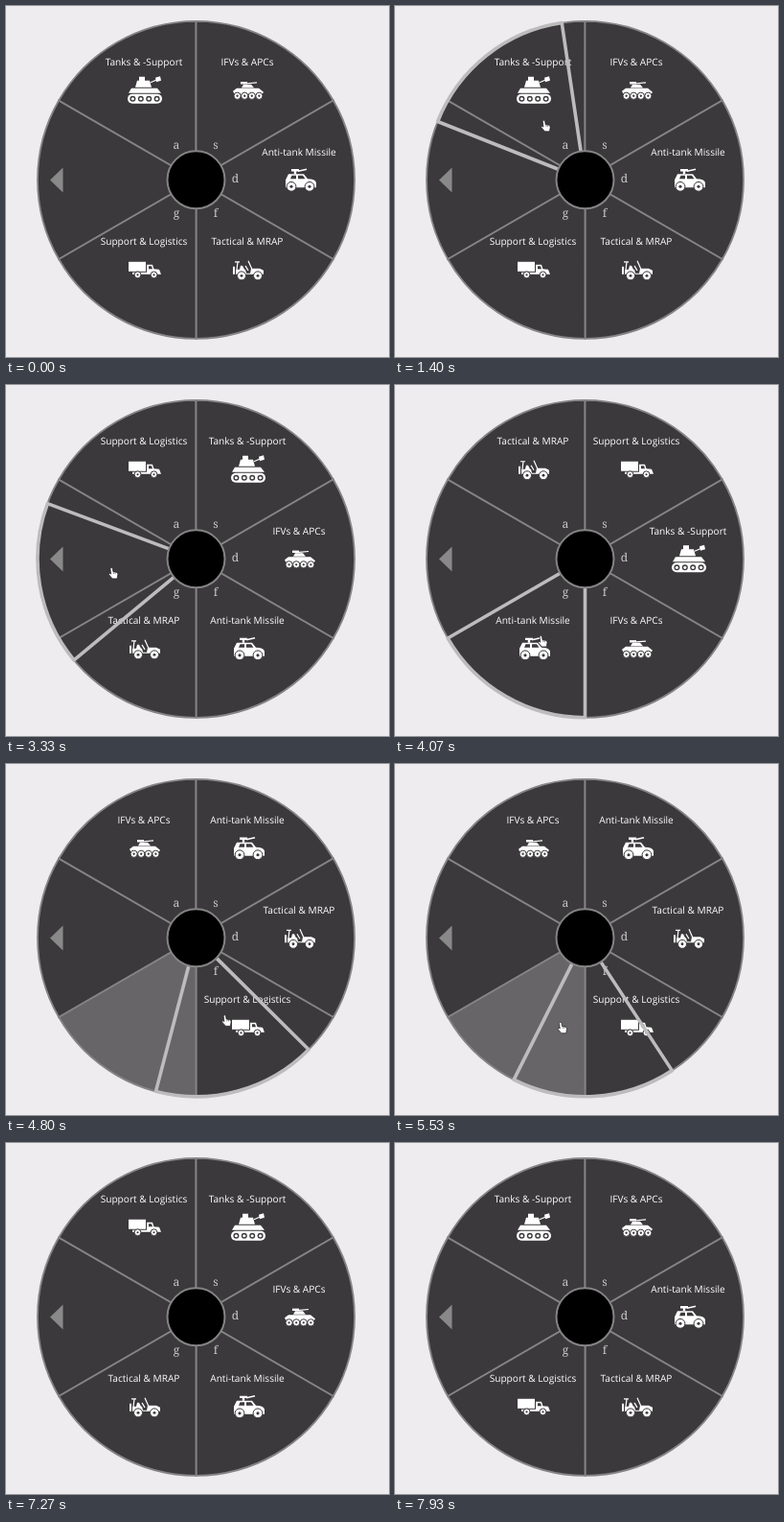
Animation of 400 by 366 pixels, one loop 8 s. Source, as an HTML page:

```html
<!DOCTYPE html>
<html lang="en">
<head>
<meta charset="utf-8">
<title>Radial vehicle menu</title>
<style>
  html, body { margin: 0; width: 100%; height: 100%; overflow: hidden; background: #eeecee; }
  svg { display: block; width: 100%; height: 100%; }
  text { text-anchor: middle; text-rendering: geometricPrecision; }
  .label { font: 10.15px "Open Sans", "Noto Sans", sans-serif; fill: #fff; }
  .key { font: 300 12px "Noto Serif", "Liberation Serif", serif; fill: #cbcacb; }
  .w { fill: #fff; }
  .d { fill: #3b393b; }
  .l { fill: none; stroke: #fff; }
</style>
</head>
<body>
<svg viewBox="0 0 400 366">
  <defs id="icons"></defs>
  <rect width="400" height="366" fill="#eeecee"/>
  <g id="sectors" stroke="#858485" stroke-width="1.8"></g>
  <path d="M46 181.5 59.5 168.5V194.5Z" fill="#8a898a"/>
  <g id="slots"></g>
  <path id="glow" fill="none" stroke="#bdbcbd" stroke-width="3.6" stroke-linejoin="round"/>
  <circle cx="198.5" cy="181.3" r="30" stroke="#858485" stroke-width="2"/>
  <g id="hand">
    <path d="M-1 1C-1-.6 1.2-.6 1.4 1L1.9 4 5.6 4.8Q7 5.2 6.9 6.8L6.2 11.3H1.3L-2.4 7.2Q-3 5.8-1.4 5.8L-.3 6.6Z"
      fill="#fff" stroke="#222" stroke-width=".7"/>
    <path d="M2.7 4.4V6.4M4.3 4.8V6.6" stroke="#555" stroke-width=".6"/>
  </g>
</svg>
<script>
const LOOP = 8000, CX = 198.5, CY = 181.3, R = 165.5, HUB = 30;
const ENTER = 270, LIT = 470, LEAVE = 6600, GONE = 6730;
const $ = id => document.getElementById(id);
const clamp = v => Math.max(0, Math.min(1, v));

const row = (n, gap, draw) => Array.from({ length: n }, (_, i) => draw((i - (n - 1) / 2) * gap)).join('');
const wheel = (x, y, r) =>
  `<circle class="w" cx="${x}" cy="${y}" r="${r}" stroke="#3b393b" stroke-width="1"/>` +
  `<circle class="d" cx="${x}" cy="${y}" r="${r * .32}"/>`;

const items = [
  { name: 'Tanks &amp; -Support', art:
    `<path class="w" d="M-17 3-14-2H13L17 3Z M-10-3-8-10H-6V-14H0V-10H5L7-3Z"/>
     <path class="l" d="M6-8 13-11" stroke-width="1.2"/>
     <path class="w" d="M11-13 16-14.5 17-10 12-8.5Z"/>
     <rect class="w" x="-18" y="4" width="36" height="10" rx="5"/>` +
    row(4, 8.4, x => `<circle class="d" cx="${x}" cy="9" r="3"/><circle class="w" cx="${x}" cy="9" r="1.6"/>`) },
  { name: 'IFVs &amp; APCs', art:
    `<path class="w" d="M-16 1-12-2H11L16 2 14 5H-14Z M-7-2.5-5-6H3L6-2.5Z"/>
     <path class="l" d="M-8-7.5H-1" stroke-width="2.4"/><path class="l" d="M-1-7 9-7.8" stroke-width="1.2"/>` +
    row(4, 7.6, x => wheel(x, 6, 3.6)) },
  { name: 'Anti-tank Missile', art:
    `<path class="w" d="M-15 8V0L-12-6H4L8-1Q16-1 17 3V8Z"/>
     <path class="d" d="M-10-1-8.5-4.5H-4V-1Z M-2-1V-4.5H3L5.5-1Z"/>
     <path class="l" d="M-9-10H-1M-5-10V-6" stroke-width="2.4"/>
     <path class="l" d="M-2-9 7-11" stroke-width="1.6"/>` +
    wheel(-9, 7, 4.9) + wheel(10, 7, 4.9) },
  { name: 'Tactical &amp; MRAP', art:
    `<path class="w" d="M-13 0H-3L-2 4H2L3-1H12L16 1V5H-13Z M-16-3H-14V5H-16Z M-8-4H-6L-4 0H-9Z"/>
     <path class="l" d="M-14-8H-9M-11-8-12 0M4 0 0-9M-3-4 0 1" stroke-width="1.2"/>` +
    wheel(-7, 6.5, 4.5) + wheel(10, 6.5, 4.5) },
  { name: 'Support &amp; Logistics', art:
    `<path class="w" d="M-17-8H1V2H-17Z M2-5H8L9.5-.5 15 0 17 5H2Z M-13 3H3V5H-13Z"/>
     <path class="d" d="M4-3.5H7L8-.5H4Z"/>` +
    wheel(-7.5, 5.5, 3.4) + wheel(9.5, 5.5, 3.4) }
];

// Picks: time, item taken out, ms until it returns at the end, first item if not the next one.
const picks = [
  [0, 4, 0], [1870, 2, 330], [2600, 3, 330], [3470, 2, 0], [4200, 0, 1500],
  [6130, 2, 1000, 1], [7130, 3, 140], [7330, 4, 70], [7600, 2, 270], [7930, 4, 0]
];

// Sweeps over the sectors: start, sector count, direction, ms per sector.
const sweeps = [
  [700, 5, -1, 144], [1560, 2, -1, 160], [2350, 2, -1, 200], [3211, 1, -1, 0], [3850, 1, 1, 0],
  [4250, 1, -1, 0], [4473, 2, 1, 227], [5480, 4, -1, 170], [LEAVE, 1, -1, 0]
];
const turns = sweeps.flatMap(([start, n, dir, gap]) =>
  Array.from({ length: n }, (_, i) => ({ at: start + i * gap, step: 60 * dir })));

const polar = (deg, r) => {
  const a = deg * Math.PI / 180;
  return [CX + r * Math.cos(a), CY - r * Math.sin(a)];
};
const rim = mid =>
  `M${polar(mid + 30, HUB)}L${polar(mid + 30, R)}A${R} ${R} 0 0 1 ${polar(mid - 30, R)}L${polar(mid - 30, HUB)}`;

$('icons').innerHTML = items.map((it, i) => `<g id="icon${i}">${it.art}</g>`).join('');
$('sectors').innerHTML = [180, 120, 60, 0, -60, -120].map(a => `<path class="d" d="${rim(a)}"/>`).join('');
$('slots').innerHTML = [...'asdfg'].map((key, i) => {
  const [x, y] = polar(120 - 60 * i, 108), [kx, ky] = polar(120 - 60 * i, 41);
  return `<g><text class="label" x="${x - .5}" y="${y - 25.5}"></text><use x="${x + .5}" y="${y}"/>
    <text class="key" x="${kx}" y="${ky + 3}">${key}</text></g>`;
}).join('');

const groups = [...$('slots').children];
const lastSector = $('sectors').lastElementChild;

function pageAt(t) {
  const [start, gone, hold, first = gone + 1] = picks.findLast(p => p[0] <= t);
  const page = items.map((_, i) => (first + i) % items.length).filter(id => id !== gone);
  return t < start + hold ? page : [...page, gone];
}

function showPage(page) {
  groups.forEach((g, i) => {
    const full = i < page.length;
    g.setAttribute('display', full ? 'inline' : 'none');
    if (!full) return;
    g.children[0].innerHTML = items[page[i]].name;
    g.children[1].setAttribute('href', '#icon' + page[i]);
  });
  lastSector.style.fill = page.length < groups.length ? '#676567' : '#3b393b';
}

const turned = progress => turns.reduce((sum, { at, step }) => sum + step * progress(at), 60);
// The highlight snaps after the pointer has crossed a border.
const glowAngle = t => turned(at => 1 - (1 - clamp((t - at) / 200)) ** 2);
const handAngle = t => turned(at => clamp((t - at) / 300 + .5));

function handAt(t) {
  const deg = handAngle(t);
  const orbit = 79 - 14 * Math.cos((deg - 50) * Math.PI / 180);
  const outside = 190 * (1 - clamp((t - ENTER) / 250)) + 115 * clamp((t - LEAVE) / (GONE - LEAVE));
  return polar(deg, orbit + outside);
}

const show = (el, on) => el.setAttribute('display', on ? 'inline' : 'none');

function draw(t) {
  showPage(pageAt(t));
  show($('glow'), t >= LIT && t < GONE);
  show($('hand'), t >= ENTER && t < GONE);
  $('glow').setAttribute('d', rim(glowAngle(t)));
  $('hand').setAttribute('transform', `translate(${handAt(t)})`);
}

const begin = performance.now();
function tick() {
  draw((performance.now() - begin) % LOOP);
  requestAnimationFrame(tick);
}
tick();
</script>
</body>
</html>
```
